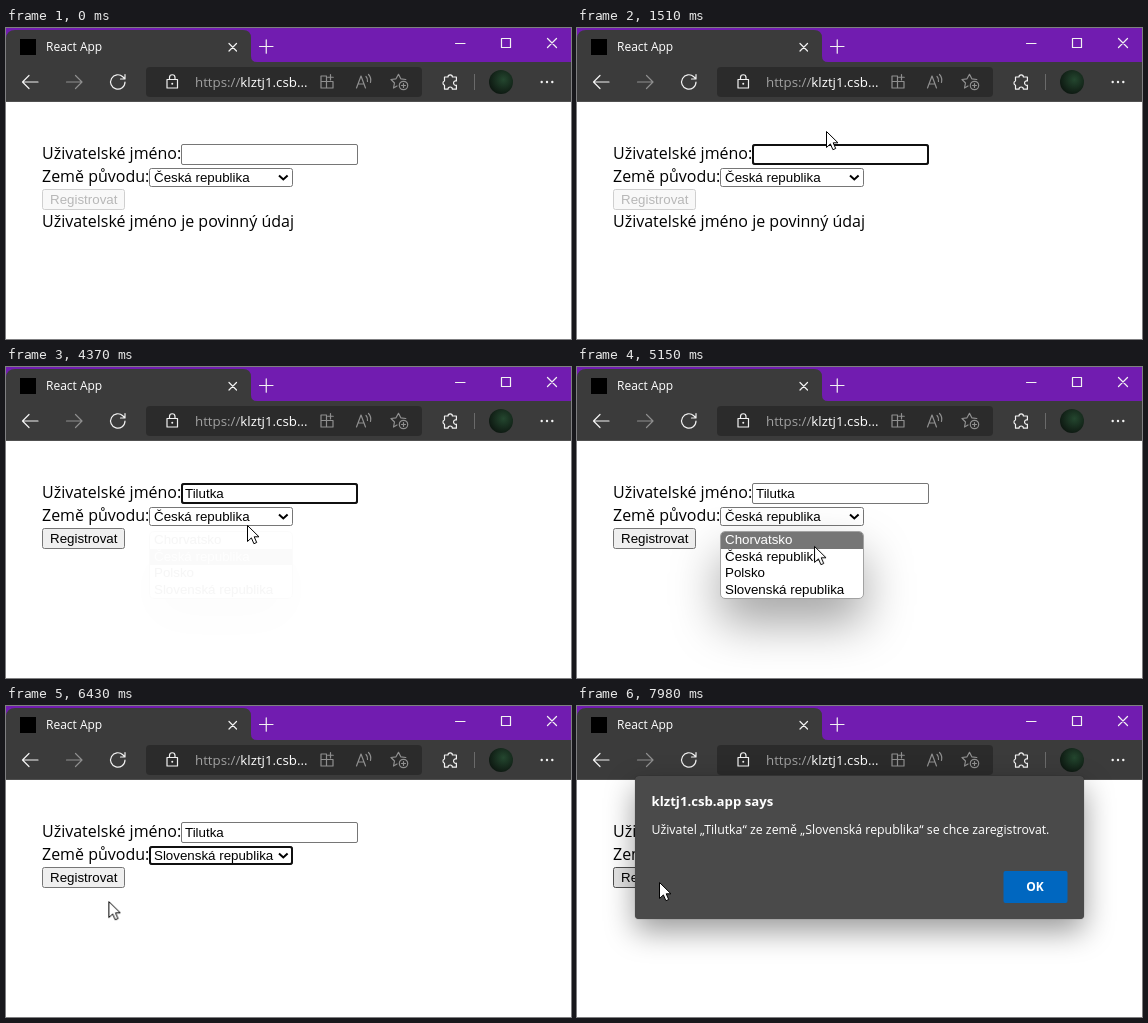
Recreate the animation shown at these times as an HTML page. Size 565 px wide and 311 px high, loop 8 s.

```html
<!DOCTYPE html>
<html lang="cs">
<head>
<meta charset="utf-8">
<title>React App</title>
<style>
html, body { margin: 0; width: 100%; height: 100%; overflow: hidden; background: #fff; }
#stage { position: relative; width: 565px; height: 311px; overflow: hidden; }
#stage > * { position: absolute; }
svg { display: block; overflow: visible; }
text, #dialog { font-family: "Open Sans", "Noto Sans", sans-serif; }
.label { font-size: 16px; }
.ctl { font: 13.333px "Liberation Sans", Arial, sans-serif; }
.line { fill: none; stroke: #f2f2f2; stroke-width: 1.2; stroke-linecap: round; stroke-linejoin: round; }
.dim { stroke: #8f8f8f; }
.box { fill: #fff; stroke: #767676; }
.ring { fill: none; stroke: #101010; stroke-width: 2; opacity: 0; }

/* hard state changes, one 8 s timeline */
.s { animation: 8s step-end infinite; }
#msg { animation-name: msg; }
#nameRing { animation-name: nameRing; }
#landRing { animation-name: landRing; }
#cz { animation-name: msgCz; }
#sk { opacity: 0; animation-name: showSk; }
#btn { fill: #f8f8f8; stroke: #cfcfcf; animation-name: btn; }
#btnText { fill: #b7b7b7; animation-name: btnText; }
#name { left: 179px; top: 119px; height: 16px; line-height: 15px; width: 0; overflow: hidden; white-space: nowrap; animation-name: type; }
@keyframes msg { 25% { opacity: 0; } }
@keyframes nameRing { 12.5% { opacity: 1; } 54.75% { opacity: 0; } }
@keyframes landRing { 72.9% { opacity: 1; } 93.15% { opacity: 0; } }
@keyframes msgCz { 72.9% { opacity: 0; } }
@keyframes showSk { 72.9% { opacity: 1; } }
@keyframes btn {
  25% { fill: #efefef; stroke: #767676; }
  82.3% { fill: #e5e5e5; stroke: #4f4f4f; }
  93.1% { fill: #f5f5f5; stroke: #8d8d8d; }
  94% { fill: #e5e5e5; stroke: #4f4f4f; }
}
@keyframes btnText { 25% { fill: #000; } }
@keyframes type {
  25% { width: 8.2px; } 27.5% { width: 11.2px; } 30% { width: 14.2px; } 31.6% { width: 21.6px; }
  34.4% { width: 25.3px; } 35.8% { width: 32px; } 37.2% { width: 42px; }
}

/* country list */
#list {
  left: 143px; top: 164px; width: 142px; height: 66px; overflow: hidden;
  border: 1px solid #a2a2a2; border-radius: 5px; background: #fff;
  box-shadow: 0 24px 48px rgba(0, 0, 0, .36); opacity: 0; animation: list 8s linear infinite;
}
#list div { height: 16.5px; line-height: 16.5px; padding-left: 4px; }
@keyframes list {
  0%, 54.6% { opacity: 0; } 55.75%, 72.8% { opacity: 1; } 74.2%, 100% { opacity: 0; }
}
#r0 { animation-name: r0; }
#r1 { background: #767676; color: #fff; animation-name: r1; }
#r2 { animation-name: r2; }
#r3 { animation-name: r3; }
@keyframes r0 { 62.7% { background: #767676; color: #fff; } 64.7% { background: #fff; color: #000; } }
@keyframes r1 {
  62.7% { background: #fff; color: #000; } 64.7% { background: #767676; color: #fff; }
  67% { background: #fff; color: #000; }
}
@keyframes r2 { 67% { background: #767676; color: #fff; } 69.4% { background: #fff; color: #000; } }
@keyframes r3 { 69.4% { background: #767676; color: #fff; } }

/* alert */
#dialog {
  left: 57.5px; top: 70px; width: 449px; height: 143px; border-radius: 4px;
  background: #4a4a4a; color: #fff; white-space: nowrap;
  box-shadow: 0 0 1px rgba(0, 0, 0, .6), 0 12px 30px rgba(0, 0, 0, .4);
  opacity: 0; animation: dialog 8s linear infinite;
}
#dialog text { fill: #fff; }
@keyframes dialog {
  0%, 94.4% { opacity: 0; transform: perspective(1000px) translateY(-18px) rotateX(6.2deg) scale(1.01); }
  96.6%, 100% { opacity: 1; transform: perspective(1000px) translateY(0) rotateX(0) scale(1); }
}

/* pointer */
#cursor { left: 0; top: 0; width: 13px; height: 20px; animation: move 8s linear infinite; }
#cursor path { fill: #fff; stroke: #000; }
#arrow { opacity: 0; animation-name: arrow; }
#beam { opacity: 0; animation-name: beam; }
@keyframes move {
  0%, 3.1% { transform: translate(300px, 285px); animation-timing-function: ease-in-out; }
  10.5%, 14.4% { transform: translate(256px, 127px); animation-timing-function: ease-in-out; }
  18.9%, 44% { transform: translate(249px, 103px); animation-timing-function: ease-in-out; }
  53.4%, 61.75% { transform: translate(241px, 158px); }
  64.4% { transform: translate(237px, 179px); }
  70.4%, 76.25% { transform: translate(232px, 219px); animation-timing-function: ease-in; }
  78.1% { transform: translate(170px, 212px); }
  80.4% { transform: translate(102px, 195px); animation-timing-function: ease-out; }
  83.9%, 99.74% { transform: translate(81px, 175px); }
  99.75%, 100% { transform: translate(82px, 176px); }
}
@keyframes arrow {
  3.1% { opacity: 1; } 9.3% { opacity: 0; } 16.7% { opacity: 1; }
  47.6% { opacity: 0; } 49.6% { opacity: 1; }
}
@keyframes beam {
  9.3% { opacity: 1; } 16.7% { opacity: 0; } 47.6% { opacity: 1; } 49.6% { opacity: 0; }
}
</style>
</head>
<body>
<div id="stage">
  <svg width="565" height="311" viewBox="0 0 565 311">
    <defs>
      <radialGradient id="photo" cx=".6" cy=".4" r=".7">
        <stop offset="0" stop-color="#24472f"/><stop offset="1" stop-color="#0b130e"/>
      </radialGradient>
    </defs>
    <!-- title bar -->
    <path fill="#711cb0" d="M0 0H565V35H0Z"/>
    <path fill="#3b3b3b" d="M0 34V10Q1 2 9 2H237Q245 2 245 10V28Q245 34 251 34H565V74H0Z"/>
    <path fill="#000" d="M14 11h16v16H14Z"/>
    <text x="40" y="23" font-size="12" fill="#fff">React App</text>
    <path class="line" d="M223 15.500l7.500 7.500m0-7.500l-7.500 7.500M253.500 18.500h13.500m-6.750-6.750v13.500"/>
    <path class="line" d="M449.500 15.500h9.500M495.500 10.500h9v9h-9ZM541.500 10.500l9 9m0-9l-9 9"/>
    <!-- toolbar -->
    <path class="line" d="M32 54H16.500m6.500-6.500L16.500 54l6.500 6.500"/>
    <path class="line dim" d="M60.500 54H76m-6.500-6.500L76 54l-6.500 6.500"/>
    <path class="line" stroke-width="1.500" d="M119 54a7.200 7.200 0 1 1-2.200-5.200l2 2M119 46.500v4.500h-4.500"/>
    <rect x="140" y="39" width="276" height="30" rx="4" fill="#2b2b2b"/>
    <path class="line" d="M161 51.500h10.500v8.500H161ZM163.500 51.500v-2a2.750 2.750 0 0 1 5.500 0v2"/>
    <circle cx="166.250" cy="55.700" r="1" fill="#f2f2f2"/>
    <text x="189" y="59" font-size="13.300" fill="#a0a0a0">https://<tspan fill="#fff">klztj1.csb...</tspan></text>
    <path class="line dim" d="M315 48h5.500v5.500h-5.500ZM315 53.500h5.500v6.500h-5.500ZM320.500 53.500h6.500v6.500h-6.500ZM324.500 46.500v5.500m-2.750-2.750h5.500"/>
    <path class="line dim" d="M350.500 60l4.500-12 4.500 12m-7.500-4h6M360 48.500q2 2 1.500 5M362.500 46.500q3 3 2 8"/>
    <path class="line dim" d="M391 58l-3.500 2 1-5-3.500-3.500 5-.7 2.500-4.500 2.300 4.500 5 .7"/>
    <circle class="line dim" cx="397.500" cy="57.500" r="4.200"/>
    <path class="line dim" d="M397.500 55.500v4m-2-2h4"/>
    <path class="line" d="M438.500 49h3.500a2.200 2.200 0 0 1 4.400 0h4v4a2.200 2.200 0 1 0 0 4.200v4h-4a2.200 2.200 0 0 0-4.400 0h-3.500v-4a2.200 2.200 0 0 1 0-4.200Z"/>
    <path d="M468.500 46v16" stroke="#6a6a6a"/>
    <circle cx="495" cy="54" r="12" fill="url(#photo)"/>
    <g fill="#f2f2f2"><circle cx="535.700" cy="54" r="1.200"/><circle cx="541" cy="54" r="1.200"/><circle cx="546.300" cy="54" r="1.200"/></g>
    <path d="M0 73.500H565" stroke="#505050"/>
    <!-- form -->
    <text class="label" x="36" y="131">Uživatelské jméno:</text>
    <rect class="box" x="175.500" y="116.500" width="176" height="20" rx="1.500"/>
    <rect class="ring s" id="nameRing" x="176" y="117" width="175" height="19" rx="2"/>
    <text class="label" x="36" y="154">Země původu:</text>
    <rect class="box" x="143.500" y="140.500" width="143" height="18" rx="2"/>
    <rect class="ring s" id="landRing" x="144" y="141" width="142" height="17" rx="2"/>
    <text class="ctl s" id="cz" x="148" y="154">Česká republika</text>
    <text class="ctl s" id="sk" x="148" y="154">Slovenská republika</text>
    <path d="M273 147.500l4.300 4 4.300-4" fill="none" stroke="#000" stroke-width="2"/>
    <rect class="s" id="btn" x="36.500" y="161.500" width="82" height="20" rx="2"/>
    <text class="ctl s" id="btnText" x="44" y="176">Registrovat</text>
    <text class="label s" id="msg" x="36" y="199">Uživatelské jméno je povinný údaj</text>
  </svg>
  <div class="ctl s" id="name" style="line-height:15px">Tilutka</div>
  <div class="ctl" id="list">
    <div class="s" id="r0">Chorvatsko</div>
    <div class="s" id="r1">Česká republika</div>
    <div class="s" id="r2">Polsko</div>
    <div class="s" id="r3">Slovenská republika</div>
  </div>
  <div id="dialog">
    <svg width="449" height="143">
      <text x="16.500" y="30" font-size="13.200" font-weight="700">klztj1.csb.app says</text>
      <text x="16.500" y="58" font-size="12.350">Uživatel „Tilutka“ ze země „Slovenská republika“ se chce zaregistrovat.</text>
      <rect x="368.500" y="95" width="64" height="32" rx="2" fill="#0067c0"/>
      <text x="400" y="115" font-size="12" font-weight="700" text-anchor="middle">OK</text>
    </svg>
  </div>
  <svg id="cursor" viewBox="0 0 13 20">
    <path class="s" id="arrow" d="M.5.5V16.500L4.400 12.900 6.900 18.700 9.700 17.500 7.200 11.800H12Z"/>
    <path class="s" id="beam" d="M-2.500-7.500h2q.5 0 .5.5 0-.5.5-.5h2M0-7V7M-2.500 7.500h2q.5 0 .5-.5 0 .5.5.5h2"/>
  </svg>
</div>
</body>
</html>
```
